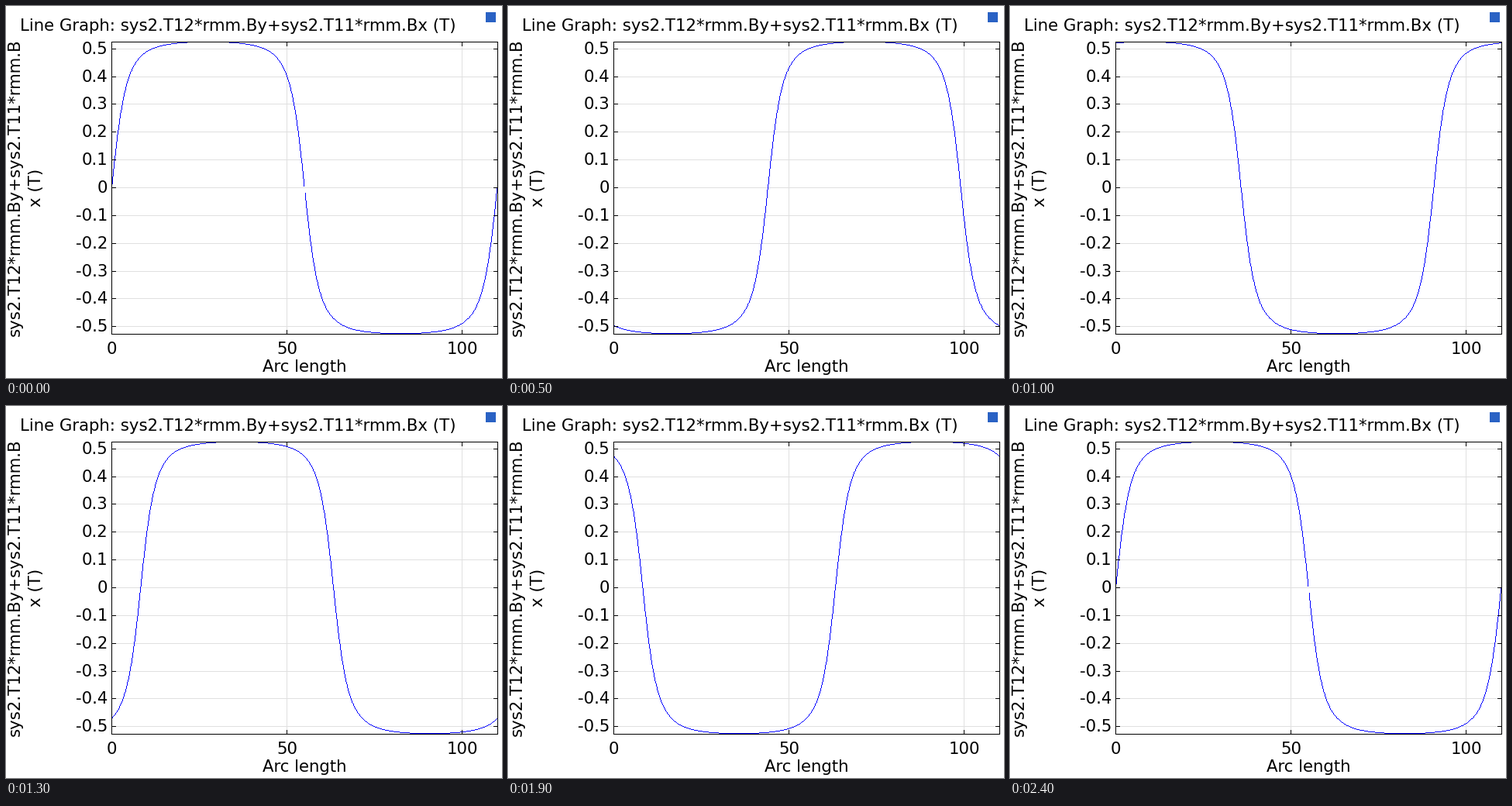
A matplotlib script that plays this animation: 640 px wide and 480 px high, repeating every 2.5 s.

```python
import numpy as np
import matplotlib.pyplot as plt
from matplotlib.animation import FuncAnimation
from matplotlib.collections import LineCollection
from matplotlib.patches import Rectangle

W, H, DPI = 640, 480, 100
PX = 72 / DPI
LEFT, TOP, RIGHT, BOTTOM = 136, 46, 634, 423
FRAMES, INTERVAL = 25, 100
POLE = 55          # arc length of one pole
STEP = 2.75        # arc length of one solver step
CELL = POLE / 60   # mesh cell along the arc

plt.rcParams["font.family"] = "DejaVu Sans"
fig = plt.figure(figsize=(W / DPI, H / DPI), dpi=DPI, facecolor="white")
ax = fig.add_axes([0, 0, 1, 1])
ax.set_xlim(0, W)
ax.set_ylim(H, 0)
ax.axis("off")


def to_x(arc):
    return 136.5 + 4.522 * arc


def to_y(tesla):
    return 234.5 - 358.5 * tesla


def stroke(x0, y0, x1, y1, color="black", z=4):
    ax.plot([x0, x1], [y0, y1], color=color, lw=PX, snap=False,
            solid_capstyle="butt", zorder=z)


def hline(x0, x1, row, **kw):
    stroke(x0, row + 0.5, x1, row + 0.5, **kw)


def vline(col, y0, y1, **kw):
    stroke(col + 0.5, y0, col + 0.5, y1, **kw)


def label(x, y, text, ha="left", **kw):
    ax.text(x, y, text, fontsize=21.25 * PX, ha=ha, va="baseline",
            rotation_mode="anchor", **kw)


def shape(arc, step):
    """Flux density relative to its peak, for a rotor turned by some steps."""
    angle = np.pi * (arc - STEP * step) / POLE
    s, c = np.sin(angle), 0.25 * np.cos(angle)
    return s / np.hypot(s, c), np.sign(c)


def flux(arc, step):
    """Flux density in tesla with the small jumps between mesh cells."""
    r, side = shape(arc, step)
    ripple = (arc / CELL) % 1 - 0.5
    return 0.525 * r + 0.007 * ripple * (1 - r**2) * side


# Grid, ticks and their labels
for i in range(-5, 6):
    row = int(to_y(i / 10))
    hline(LEFT + 1, RIGHT, row, color="#e0e0e0", z=1)
    hline(LEFT, LEFT + 6, row)
    hline(RIGHT - 5, RIGHT + 1, row)
    label(131.5, row + 7, f"{i / 10:g}", ha="right")

for arc in (0, 50, 100):
    col = int(to_x(arc))
    if arc:
        vline(col, TOP + 1, BOTTOM, color="#e0e0e0", z=1)
    vline(col, TOP, TOP + 6)
    vline(col, BOTTOM - 5, BOTTOM + 1)
    label(col + 0.5, 449, str(arc), ha="center")

# Frame
for row in (TOP, BOTTOM):
    hline(LEFT, RIGHT + 1, row)
for col in (LEFT, RIGHT):
    vline(col, TOP, BOTTOM + 1)

# Titles
label(18.5, 32.5, "Line Graph: sys2.T12*rmm.By+sys2.T11*rmm.Bx (T)")
label(385, 471.5, "Arc length", ha="center")
label(18, 426, "sys2.T12*rmm.By+sys2.T11*rmm.B", rotation=90)
label(45, 259, "x (T)", rotation=90)

ax.add_patch(Rectangle((619, 8), 13, 13, color="#2a62c4", lw=0))

# The curve is one crisp vertical run of pixels per column
edges = np.arange(LEFT + 1, RIGHT + 1)
edge_arcs = (edges - 136.5) / 4.522
mids = edges[:-1] + 0.5
mid_arcs = (mids - 136.5) / 4.522
curve = LineCollection([], colors="blue", linewidths=PX, capstyle="butt",
                       snap=False, zorder=2)
ax.add_collection(curve, autolim=False)


def update(frame):
    step = 10 * frame // 3
    rows = np.floor(to_y(flux(edge_arcs, step)))
    low = np.minimum(rows[:-1], rows[1:])
    high = np.maximum(low + 1, np.maximum(rows[:-1], rows[1:]))
    runs = np.stack([np.column_stack([mids, low]),
                     np.column_stack([mids, high])], axis=1)
    if step % 40 == 0:  # the line breaks where the poles meet the seam
        runs = runs[np.abs(shape(mid_arcs, step)[0]) > 0.02]
    curve.set_segments(runs)
    return curve,


anim = FuncAnimation(fig, update, frames=FRAMES, interval=INTERVAL,
                     repeat=True, repeat_delay=0)
plt.show()
```
